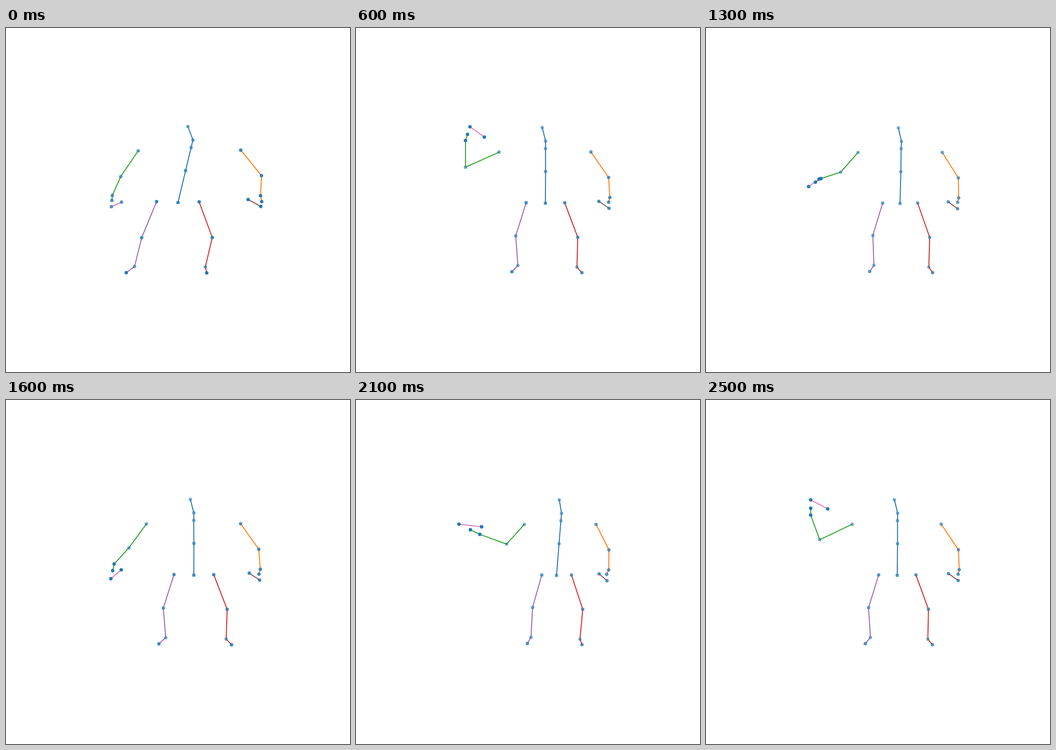
Write an HTML page that moves like this. It is 748x748 px and loops after 2600 ms.

```html
<!DOCTYPE html>
<html lang="en">
<head>
<meta charset="utf-8">
<title>Skeleton motion</title>
<style>
html, body { margin: 0; width: 100%; height: 100%; overflow: hidden; background: #fff; }
svg { display: block; width: 100%; height: 100%; }
polyline { fill: none; stroke-width: 2.08; stroke-linecap: square; stroke-linejoin: round; }
circle { fill: #1f77b4; stroke: #1f77b4; stroke-width: 1.39; }
</style>
</head>
<body>
<svg viewBox="0 0 748 748"><g id="bones"></g><g id="joints"></g></svg>
<script>
const LOOP = 2600, STEP = 100, PERIOD = 1700;

// One arm swing; after the first, the swing repeats from its second key.
const swing = [0, 100, 400, 600, 800, 1000, 1300];
const repeat = keys => [...keys, ...keys.slice(1, 5)];
const times = repeat(swing).map((t, i) => i < swing.length ? t : t + PERIOD);

// Sway picks a body pose from 0 to 3; angles are degrees from straight down.
const sway = repeat([0, 1, 3, 1.6, 1.82, 2, 2.17]);
const bend = repeat([24, 34, 110, 180, 160, 121, 72]);
const reach = repeat([45, 50, 62, 58, 57, 42, 45]);
const palmTurn = repeat([5, 0, 116, 198, 180, 130, 57]);
const palmSize = repeat([24.5, 33.5, 50.5, 31.5, 33, 26.5, 32]);
const thumbX = repeat([20, 26, 4, 41, 37, 22, -4]);
const thumbY = repeat([14.5, 16, -16.5, -7.5, -13.5, -18, 1]);

// Joints: x at sway 0, 1, 2, 3; y at sway 0 and 2; nearness to the viewer.
const spine = [
  [395.5, 392, 413.5, 442, 214, 217, 0],
  [406.5, 400, 420.5, 447, 243.5, 246.5, .1],
  [402.5, 400, 420, 445.5, 260, 262.5, .1],
  [390.5, 400.5, 420, 441.5, 310, 312.5, .4],
  [374, 401, 419, 436, 379.5, 381.5, .7]
];
const leftArm = [
  [510.5, 509, 512, 522, 265.5, 270.5, .7],
  [555.5, 550.5, 548.5, 550, 321, 326, .8],
  [553.5, 555.5, 549.5, 549.5, 364.5, 369.5, 1],
  [556, 552, 547.5, 545, 377.5, 379, 1]
];
const leftLeg = [
  [420, 447, 458.5, 468.5, 378, 380.5, .9],
  [448.5, 478, 485, 493, 455.5, 455, .75],
  [433.5, 475, 484, 487, 519.5, 520, .2],
  [436.5, 488.5, 493, 491.5, 532.5, 532, 1]
];
const rightLeg = [
  [327.5, 355, 380, 404, 377.5, 380.5, .8],
  [295, 330.5, 358.5, 384, 456, 451, .5],
  [279.5, 337, 362, 380.5, 518.5, 516, .15],
  [261.5, 318.5, 352.5, 372.5, 532, 529.5, 1]
];
const rightShoulder = [287.5, 292.5, 323.5, 366, 267, 270.5, .2];

const lerp = (a, b, u) => a + (b - a) * u;
const move = (p, dx, dy, a = p.a) => ({ x: p.x + dx, y: p.y + dy, a });
const polar = (p, deg, r, a) => {
  const turn = deg * Math.PI / 180;
  return move(p, -Math.sin(turn) * r, Math.cos(turn) * r, a);
};
const smooth = (from, to, v) => {
  const u = Math.min(1, Math.max(0, (v - from) / (to - from)));
  return u * u * (3 - 2 * u);
};

function add(parent, tag, attrs) {
  const el = document.createElementNS("http://www.w3.org/2000/svg", tag);
  for (const k in attrs) el.setAttribute(k, attrs[k]);
  return document.getElementById(parent).appendChild(el);
}

function limb(color, count) {
  const line = add("bones", "polyline", { stroke: color });
  const dots = Array.from({ length: count }, () => add("joints", "circle", { r: 3.1 }));
  return { line, dots };
}

const limbs = [
  limb("#1f77b4", 5), limb("#ff7f0e", 4), limb("#2ca02c", 4), limb("#d62728", 4),
  limb("#9467bd", 4), limb("#8c564b", 2), limb("#e377c2", 2)
];

// Monotone cubic between keys: smooth, without overshoot.
function sample(keys, t) {
  const last = times.length - 1;
  let i = 0;
  while (i < last - 1 && t >= times[i + 1]) i++;
  const slope = k => (keys[k + 1] - keys[k]) / (times[k + 1] - times[k]);
  const tangent = k => {
    if (k === 0) return slope(0);
    if (k === last) return slope(k - 1);
    const a = slope(k - 1), b = slope(k);
    return a * b > 0 ? 2 * a * b / (a + b) : 0;
  };
  const h = times[i + 1] - times[i], u = (t - times[i]) / h, v = 1 - u;
  return v * v * (1 + 2 * u) * keys[i] + u * u * (3 - 2 * u) * keys[i + 1]
    + h * u * v * (v * tangent(i) - u * tangent(i + 1));
}

function place(joint, s) {
  const i = Math.min(2, Math.floor(s));
  const [y0, y2, near] = joint.slice(4);
  const close = s < 2 ? 1 - s * s / 4 : (s - 2) / 5;
  return {
    x: lerp(joint[i], joint[i + 1], s - i),
    y: lerp(y0, y2, Math.min(1, s / 2)),
    a: .42 + .17 * near + close * (.08 + .28 * near)
  };
}

function rightArm(t, s) {
  const angle = sample(bend, t);
  const lift = smooth(105, 170, angle);
  const shade = Math.min(.97, .68 + .3 * s);
  const shoulder = place(rightShoulder, s);
  const elbow = move(shoulder, -38 - 35 * lift, 56 - 13 * smooth(25, 72, angle) - 10 * lift);
  const wrist = polar(elbow, angle, sample(reach, t), shade);
  const turn = sample(palmTurn, t), size = sample(palmSize, t);
  const hand = polar(wrist, turn, size * .45);
  const tip = polar(wrist, turn, size);
  const thumb = move(wrist, sample(thumbX, t), sample(thumbY, t));
  return { arm: [shoulder, elbow, wrist, hand], fingers: [tip, thumb] };
}

function show({ line, dots }, joints) {
  line.setAttribute("points", joints.map(p => p.x + "," + p.y).join(" "));
  dots.forEach((dot, i) => {
    const { x, y, a } = joints[i];
    dot.setAttribute("cx", x);
    dot.setAttribute("cy", y);
    dot.setAttribute("fill-opacity", a);
    dot.setAttribute("stroke-opacity", a);
  });
}

function draw(ms) {
  const t = Math.floor(ms % LOOP / STEP) * STEP;
  const s = sample(sway, t);
  const pose = joints => joints.map(j => place(j, s));
  const left = pose(leftArm), right = rightArm(t, s);
  const leftFingers = [move(left[2], .5 - 1.4 * s, 23.5), move(left[2], 2 * s - 27, 8.5)];
  [pose(spine), left, right.arm, pose(leftLeg), pose(rightLeg), leftFingers, right.fingers]
    .forEach((joints, i) => show(limbs[i], joints));
}

const start = performance.now();
function tick() {
  draw(performance.now() - start);
  requestAnimationFrame(tick);
}
tick();
</script>
</body>
</html>
```
